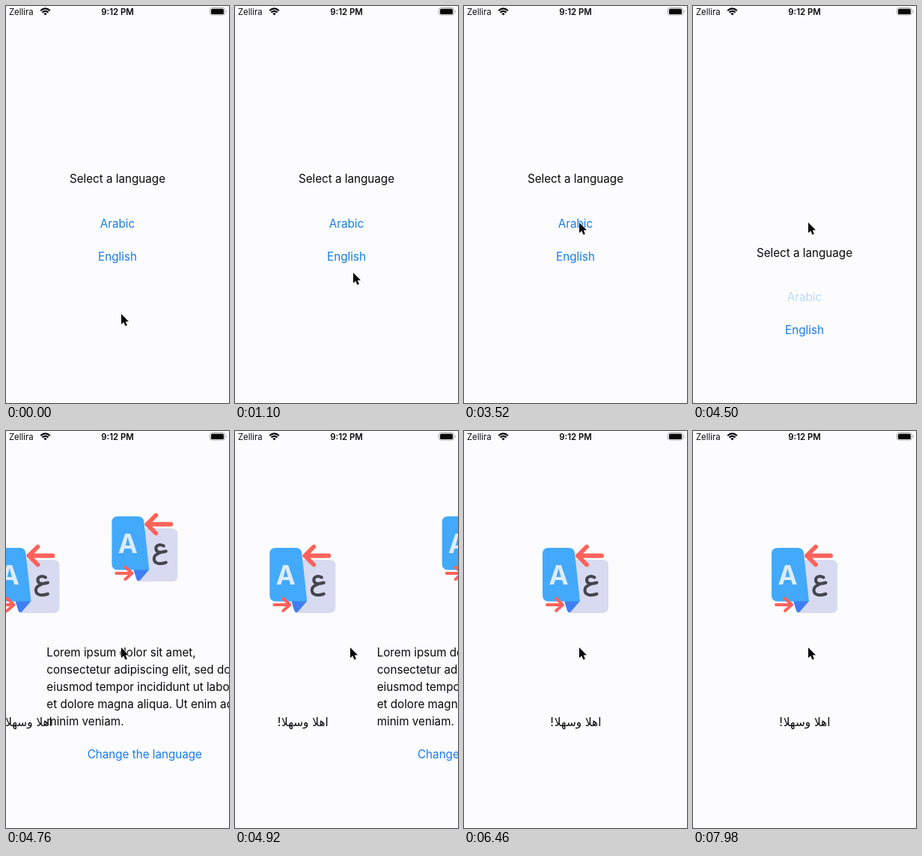
An HTML page that plays this animation: 298x530 px, repeating every 8 s.

```html
<!DOCTYPE html>
<html lang="en">
<head>
<meta charset="utf-8">
<title>Language picker</title>
<style>
  html, body { margin: 0; width: 100%; height: 100%; overflow: hidden; background: #fcfcfe; }
  svg { display: block; width: 100%; height: 100%; }
  text { font: 15.2px Inter, "Open Sans", sans-serif; fill: #080808; }
  .middle { text-anchor: middle; }
  .link { fill: #147ceb; }
  .status { font-size: 11.3px; }
  .time { font-size: 11.4px; font-weight: 600; }
  .arabic { font: 15.3px "DejaVu Sans", sans-serif; direction: rtl; }
  .letter { font-size: 35px; font-weight: 700; fill: #dcecfc; }
  .stroke { fill: none; stroke-linecap: round; stroke-linejoin: round; }
</style>
</head>
<body>
<svg viewBox="0 0 298 530">
  <defs>
    <g id="icon">
      <path fill="#d7daf0" d="M149 172H185Q193 172 193 180V235Q193 243 185 243H141Z"/>
      <path fill="#3f7ff2" d="M134 227H155L143 241Q140 244 138 240Z"/>
      <path fill="#43a9fa" d="M113 156H140Q147 156 148 163L155 227.5H113Q105 227.5 105 219V164Q105 156 113 156Z"/>
      <text class="letter middle" x="126.5" y="205">A</text>
      <path class="stroke" stroke="#45454d" stroke-width="4" d="M174.500 195.500C169 192 163.500 195 164 199.500C164.500 204 170 205 177.500 202.500C168 204 161.500 207.500 161.500 212.500C161.500 219 169 220.500 177.500 217.500"/>
      <g class="stroke" stroke="#ff625b">
        <path stroke-width="5.8" d="M184 166.500H152M164 154.500L152 166.500L164 178.500"/>
        <path stroke-width="4" d="M111 232H132M123 223.500L132 232L123 240"/>
      </g>
    </g>
  </defs>

  <g id="picker">
    <text class="middle" x="149" y="236">Select a language</text>
    <text class="link middle" id="arabicLink" x="149" y="295.500">Arabic</text>
    <text class="link middle" x="149" y="339.500">English</text>
  </g>

  <g id="welcome">
    <use href="#icon"/>
    <text class="arabic middle" x="149" y="394">اهلا وسهلا!</text>
  </g>

  <g id="intro">
    <use href="#icon" y="-42"/>
    <text y="300.500">
      <tspan x="18">Lorem ipsum dolor sit amet,</tspan>
      <tspan x="18" dy="23">consectetur adipiscing elit, sed do</tspan>
      <tspan x="18" dy="23">eiusmod tempor incididunt ut labore</tspan>
      <tspan x="18" dy="23">et dolore magna aliqua. Ut enim ad</tspan>
      <tspan x="18" dy="23">minim veniam.</tspan>
    </text>
    <text class="link middle" x="149" y="437">Change the language</text>
  </g>

  <text class="status" x="4" y="12">Zellira</text>
  <text class="time middle" x="149" y="12">9:12 PM</text>
  <g class="stroke" stroke="#080808" stroke-width="2.2" style="stroke-linecap: butt">
    <path d="M46.200 6.200Q52.500 .400 58.800 6.200M48.500 8.600Q52.500 5 56.500 8.600"/>
    <path fill="#080808" stroke="none" d="M50.300 10.300Q52.500 8.300 54.700 10.300L52.500 12.600Z"/>
  </g>
  <rect x="272.500" y="2.500" width="20" height="9.500" rx="2.800" fill="none" stroke="#a0a0a0"/>
  <rect x="274" y="3.700" width="17" height="7.200" rx="1.500" fill="#080808"/>
  <path fill="#a0a0a0" d="M294 5.500Q296 7.250 294 9Z"/>

  <path id="cursor" fill="#050505" stroke="#fff" stroke-width="1.200" paint-order="stroke"
    d="M0 0V14L3.200 11.100L5.400 16.300L7.900 15.200L5.700 10.200H10Z"/>
</svg>
<script>
const LOOP = 8000;
const part = id => document.getElementById(id);
const move = (id, x, y) => part(id).setAttribute("transform", `translate(${x} ${y})`);
const show = (id, visible) => { part(id).style.display = visible ? "" : "none"; };
const mix = (a, b, p) => a + (b - a) * p;
const progress = (t, start, end) => Math.min(1, Math.max(0, (t - start) / (end - start)));
const easeInOut = p => p * p * (3 - 2 * p);

// time, x, y of the pointer tip
const pointer = [
  [0, 154, 411], [300, 154, 411], [820, 157, 376], [1100, 158, 356],
  [1620, 158, 320], [2260, 156, 296], [2700, 154, 289], [LOOP, 154, 289]
];

function pointerAt(t) {
  const i = pointer.findIndex(key => key[0] > t);
  const [t0, x0, y0] = pointer[i - 1];
  const [t1, x1, y1] = pointer[i];
  const p = progress(t, t0, t1);
  return [mix(x0, x1, p), mix(y0, y1, p)];
}

function draw(t) {
  move("cursor", ...pointerAt(t));

  const leave = easeInOut(progress(t, 4310, 4680));
  show("picker", leave < 1);
  move("picker", 0, 188 * leave);
  part("arabicLink").style.opacity = mix(1, 0.28, progress(t, 4200, 4300));

  // The welcome page opens from the left and pushes the intro page out.
  const open = easeInOut(progress(t, 4690, 5122));
  show("welcome", open > 0);
  show("intro", open > 0 && open < 1);
  move("welcome", mix(-131, 0, open), 0);
  move("intro", mix(16, 298, open), 0);
}

function tick() {
  draw(performance.now() % LOOP);
  requestAnimationFrame(tick);
}
tick();
</script>
</body>
</html>
```
